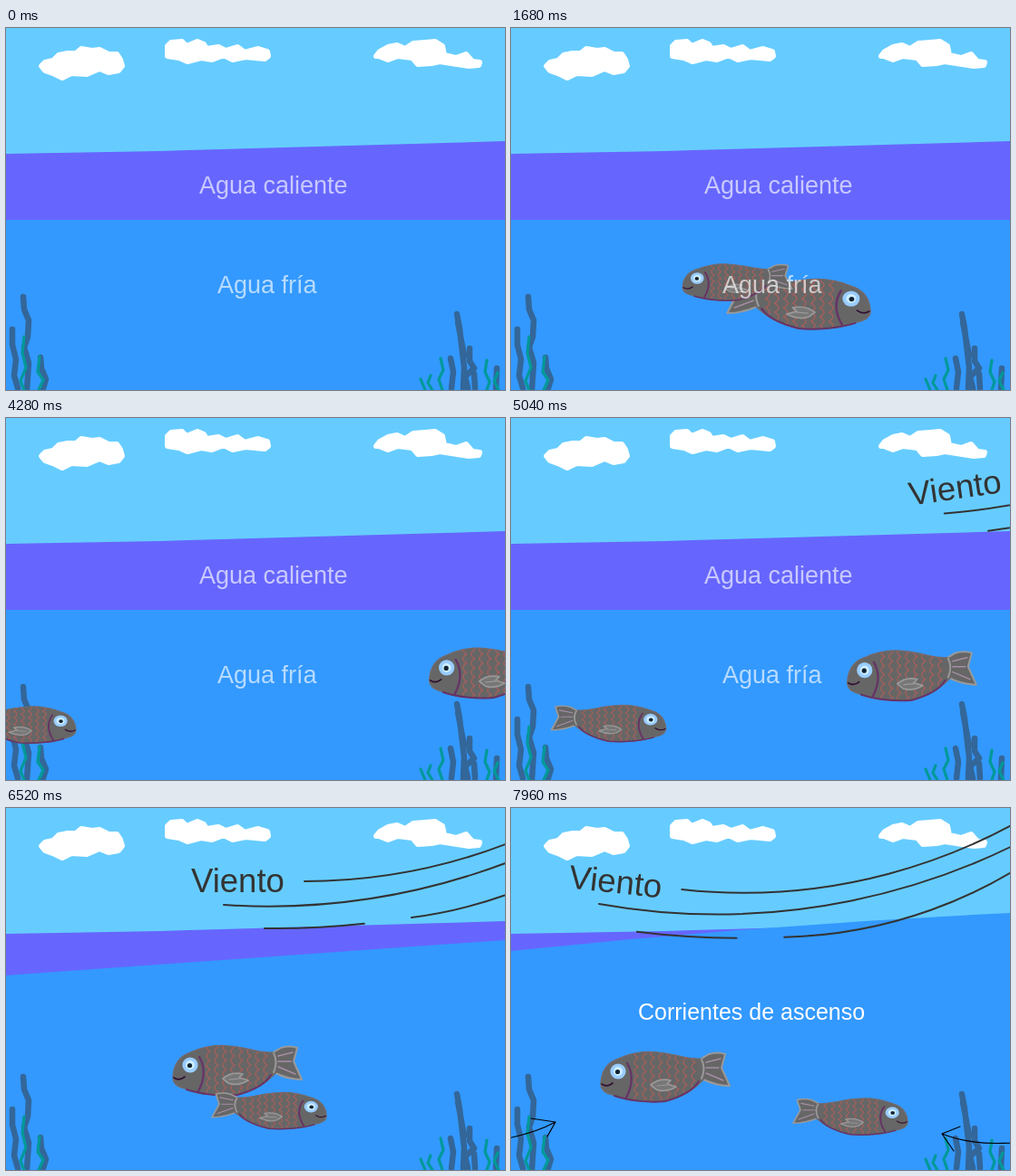
An HTML page for the animation above (8 s loop, 550 by 400 pixels).

```html
<!DOCTYPE html>
<html lang="es">
<head>
<meta charset="utf-8">
<title>Corrientes de ascenso</title>
<style>
  html, body { margin: 0; width: 100%; height: 100%; overflow: hidden; background: #6cf; }
  svg { display: block; width: 550px; height: 400px; }
  text { font-family: "Liberation Sans", Arial, sans-serif; }
  path { stroke-linecap: round; stroke-linejoin: round; }
  .line { fill: none; }
</style>
</head>
<body>
<svg viewBox="0 0 550 400">
  <defs>
    <path id="body" d="M1 34C2 22 8 12 20 8C35 1 50-1 65 1C85 3 96 9 112 8L115 30C104 42 92 50 72 55C50 57 26 54 14 48C4 46 0 40 1 34Z"/>
    <clipPath id="flank"><use href="#body"/></clipPath>
    <g id="fish">
      <path d="M110 9L120 3Q130 0 138 3L134 18L143 38Q128 38 112 30Z" fill="#666" stroke="#999" stroke-width="2"/>
      <path class="line" d="M117 12L133 8M117 18L131 18M117 24L136 32" stroke="#a58fa5" stroke-width="1.5"/>
      <use href="#body" fill="#666" stroke="#75696b" stroke-width="1.2"/>
      <path id="scales" class="line" clip-path="url(#flank)" stroke="#a0605c" stroke-width="1.4"/>
      <path class="line" d="M16 49C30 54 54 57 72 55C90 50 103 43 109 33" stroke="#636" stroke-width="2"/>
      <path class="line" d="M30 13Q40 30 29 51" stroke="#636" stroke-width="2.2"/>
      <path class="line" d="M112 9Q117 18 112 30" stroke="#999" stroke-width="2"/>
      <path d="M56 37Q65 29 78 32L74 36L84 39Q72 46 62 42Z" fill="#777" stroke="#999" stroke-width="1.7"/>
      <path class="line" d="M63 38L74 37" stroke="#999" stroke-width="1.2"/>
      <path class="line" d="M2 36Q8 40 14 35" stroke="#313" stroke-width="1.7"/>
      <circle cx="20" cy="22" r="8.6" fill="#9cf"/>
      <circle cx="20" cy="22" r="5" fill="#cef"/>
      <circle cx="19.5" cy="22.5" r="2.6" fill="#123"/>
    </g>
  </defs>

  <rect width="550" height="400" fill="#6cf"/>
  <g fill="#fff" stroke="#fff" stroke-width="6">
    <path d="M39 42L43 38L52 36L58 30L68 28L77 28L83 23L95 25L103 24L113 29L122 29L126 35L128 42L124 47L113 49L103 45L89 51L72 50L62 55L54 51L43 47Z"/>
    <path d="M178 20L182 16L194 15L199 20L211 15L218 18L221 23L234 21L242 25L255 21L263 27L278 23L288 26L289 31L285 34L264 32L250 35L240 30L227 35L215 33L200 37L191 33L178 31Z"/>
    <path d="M408 31L412 26L421 21L431 19L440 23L449 17L462 16L473 15L481 20L483 30L496 33L507 29L514 37L522 38L521 41L510 42L491 39L478 37L469 39L454 40L448 33L432 31L421 35L411 31Z"/>
  </g>
  <path d="M0 139L170 136L200 135L550 125V260H0Z" fill="#66f"/>
  <path id="cold" fill="#39f"/>

  <g class="line" stroke="#369" stroke-width="6.5">
    <path d="M19 297L20 311L25 323L24 341L20 353L25 370L23 400M7 333L7 350L11 366L9 384L13 398M38 364L39 376L44 388L41 398"/>
    <path d="M497 316L500 332L502 350L505 375L504 398M498 325L505 362M490 365L493 380L491 398M511 354L511 368L516 376L506 385L509 398M516 382L517 398M541 376L540 398"/>
  </g>
  <g class="line" stroke="#099" stroke-width="3.2">
    <path d="M20 341L18 359L22 375L16 390L20 400M37 363L35 380L41 389L36 400"/>
    <path d="M479 365L482 378L477 388L481 400M457 388L462 400M468 384L465 392L470 400M530 367L528 380L533 391L530 400M542 381L538 390L543 400"/>
  </g>

  <use id="big" href="#fish"/>
  <use id="small" href="#fish"/>

  <g id="layers" font-size="27" fill="#fff" fill-opacity=".65">
    <text x="213" y="183">Agua caliente</text>
    <text x="233" y="293">Agua fría</text>
  </g>
  <g id="rise">
    <text x="140" y="234" font-size="25" fill="#fff">Corrientes de ascenso</text>
    <g class="line" stroke="#000" stroke-width="1.2">
      <path id="arrowL" d="M-60 372Q10 368 49 347M22 343L49 347L40 363"/>
      <path id="arrowR" d="M620 358Q530 382 475 360M495 352L475 360L488 379"/>
    </g>
  </g>
  <g id="wind">
    <text x="-36" y="-14" font-size="36.5" fill="#333">Viento</text>
    <path id="gusts" class="line" stroke="#333" stroke-width="2"/>
  </g>
</svg>
<script>
const LOOP = 8000, STEP = 40;
const el = id => document.getElementById(id);
const show = (id, on) => { el(id).style.display = on ? '' : 'none'; };

// Each row is [time, ...values]; values run straight between rows.
function at(t, rows) {
  const last = rows.length - 1;
  if (t <= rows[0][0]) return rows[0].slice(1);
  if (t >= rows[last][0]) return rows[last].slice(1);
  const i = rows.findIndex(row => row[0] > t);
  const a = rows[i - 1], b = rows[i], u = (t - a[0]) / (b[0] - a[0]);
  return a.slice(1).map((v, k) => v + (b[k + 1] - v) * u);
}

// Upward bending arc from a start point, heading in degrees.
function arc(x, y, heading, radius, length) {
  const half = length / radius / 2, dir = heading * Math.PI / 180 - half;
  const chord = 2 * radius * Math.sin(half);
  return `M${x} ${y}A${radius} ${radius} 0 0 0 ${x + chord * Math.cos(dir)} ${y + chord * Math.sin(dir)}`;
}

function scales() {
  let d = '';
  for (let col = 0; col < 8; col++)
    for (let row = 0; row < 6; row++)
      d += `M${42 + col * 9} ${row * 10 + (col % 2) * 5 - 3}q-8 5 0 10`;
  return d;
}

el('scales').setAttribute('d', scales());
el('gusts').setAttribute('d',
  arc(89, -26, 0, 620, 460) + arc(0, 0, 3.8, 740, 560) +
  arc(45, 26, 0.8, 900, 110) + arc(207, 14, -7.5, 510, 330));

// Nose x and top y of each fish, out and back.
const OUT = {
  big: [[0, -7.5, 309], [3000, 715, 252]],
  small: [[0, 573, 261], [3000, -114, 260]]
};
const BACK = {
  big: [[3600, 551.5, 251.5], [6520, 183, 262], [6800, 148, 263], [7960, 98, 269]],
  small: [[3600, -6, 320], [6520, 354, 314], [6800, 388, 313.5], [7960, 438, 320.5]]
};
const COLD = [[5280, 212, 212, 0], [5680, 204, 191, 0], [6520, 185, 146, 0],
  [6800, 179, 133, -1], [7960, 158, 116, -8]];
const WIND = [[4440, 591, 105, -12], [5680, 357, 106, -4.3], [6520, 240, 107, 0], [7680, 97, 106, 6.3]];
const ARROWS = [[7200, 1], [7960, 0]];

function place(id, [x, y], sx, sy) {
  el(id).setAttribute('transform', `translate(${x} ${y}) scale(${sx} ${sy})`);
}

function draw(t) {
  const out = t < 3300, path = out ? OUT : BACK;
  place('big', at(t, path.big), out ? -1.11 : 1, 1);
  place('small', at(t, path.small), out ? 0.85 : -0.888, 0.732);

  const [left, right, bend] = at(t, COLD);
  el('cold').setAttribute('d', `M0 ${left}Q275 ${(left + right) / 2 + bend} 550 ${right}V400H0Z`);

  const [x, y, turn] = at(t, WIND);
  el('wind').setAttribute('transform', `translate(${x} ${y}) rotate(${turn})`);
  show('wind', t > 4440);

  const [away] = at(t, ARROWS);
  el('arrowL').setAttribute('transform', `translate(${-55 * away} ${20 * away})`);
  el('arrowR').setAttribute('transform', `translate(${80 * away} ${20 * away})`);
  show('layers', t < 6000);
  show('rise', t >= 7200);
}

const start = performance.now();
function tick() {
  const t = (performance.now() - start) % LOOP;
  draw(Math.floor(t / STEP) * STEP);
  requestAnimationFrame(tick);
}
tick();
</script>
</body>
</html>
```
